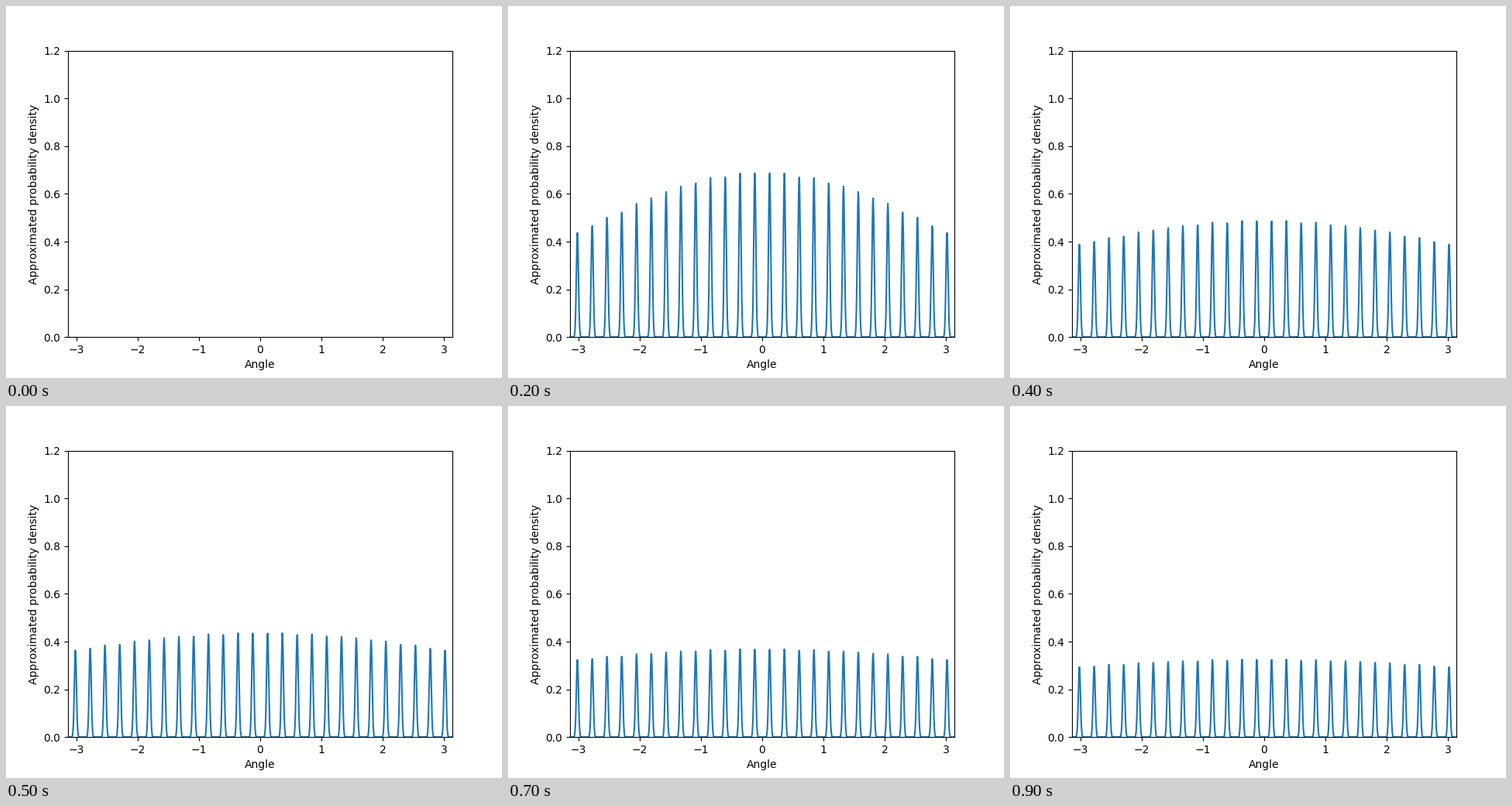
Animation, 640 px wide and 480 px high, one loop 1000 ms. Source, as a matplotlib script:

```python
import numpy as np
import matplotlib.pyplot as plt
from matplotlib.animation import FuncAnimation

FRAMES = 10
PEAKS = 26
PEAK_WIDTH = 0.017
VARIANCE_PER_STEP = 5

angles = np.linspace(-np.pi, np.pi, 1000)
spacing = 2 * np.pi / PEAKS
centers = (np.arange(PEAKS) + 0.5) * spacing - np.pi


def gaussian(x, variance):
    return np.exp(-x**2 / (2 * variance))


def density(step):
    """Comb of narrow peaks under an envelope that spreads with each step."""
    heights = np.sqrt(3 / (np.pi * step)) * gaussian(centers, VARIANCE_PER_STEP * step)
    return gaussian(angles[:, None] - centers, PEAK_WIDTH**2) @ heights


fig, ax = plt.subplots(figsize=(6.4, 4.8), dpi=100)
ax.set_xlim(-np.pi, np.pi)
ax.set_ylim(0, 1.2)
ax.set_xlabel("Angle")
ax.set_ylabel("Approximated probability density")
line, = ax.plot([], [], color="#1f77b4", lw=1.5)


def update(step):
    if step == 0:
        line.set_data([], [])
    else:
        line.set_data(angles, density(step))
    return line,


animation = FuncAnimation(fig, update, frames=FRAMES, interval=100,
                          repeat=True, repeat_delay=0)
plt.show()
```
